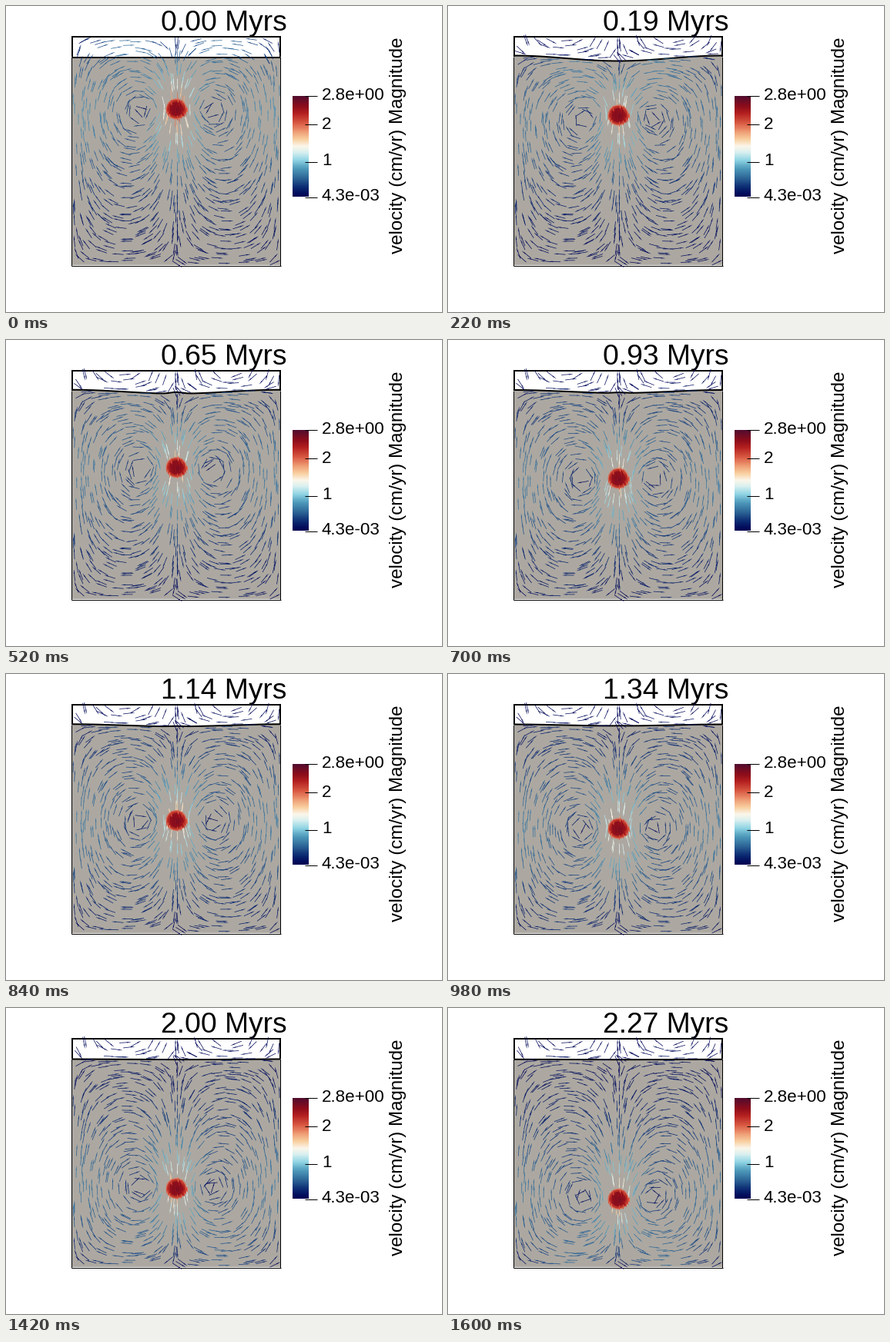
A matplotlib script that plays this animation: 566 by 398 pixels, repeating every 1.62 s.

```python
import numpy as np
import matplotlib.pyplot as plt
from matplotlib.animation import FuncAnimation
from matplotlib.collections import LineCollection, PolyCollection
from matplotlib.colors import LinearSegmentedColormap
from matplotlib.patches import Circle

W, H, DPI = 566, 398, 64
PT = 72 / DPI  # points per pixel
FRAMES, STEP = 81, 20

LEFT, RIGHT, TOP, BOTTOM = 86, 356, 40, 337
CX, HALF = 221, 135
ROCK_TOP = 66
VMAX = 2.8
GLYPH = 15

# key poses over the loop
KEYS = [0, 11, 18, 35, 49, 63, 80]
TIME = [0, 0.19, 0.41, 0.93, 1.34, 1.76, 2.27]
BALL_Y = [134, 142, 153, 180, 201, 222.5, 248.5]
EDGE = [67, 64.5, 64.5, 65, 65.5, 66.2, 66.8]
DIP = [0, 7, 6, 4, 2, 1, 0.4]
BUMP = [0, 0, 3, 0.8, 0.3, 0.2, 0]

cmap = LinearSegmentedColormap.from_list("speed", [
    (0, "#000052"), (0.08, "#08246e"), (0.18, "#2c6496"), (0.28, "#4f9abb"),
    (0.36, "#8fd4e4"), (0.44, "#d8f0f0"), (0.5, "#fbf6ea"), (0.57, "#f8cfa0"),
    (0.65, "#ee9a72"), (0.73, "#d95a43"), (0.83, "#b4201f"), (0.9, "#8c0d1b"),
    (1, "#520c2e")])

rng = np.random.default_rng(4)


def make_seeds(nx=18, ny=20, per_cell=2):
    gx, gy, _ = np.meshgrid(np.arange(nx), np.arange(ny), np.arange(per_cell))
    fx = (gx + rng.random(gx.shape)) / nx
    fy = (gy + rng.random(gy.shape)) / ny
    x = LEFT + 1 + fx.ravel() * (RIGHT - LEFT - 2)
    y = TOP + 3 + fy.ravel() * (BOTTOM - TOP - 5)
    mid = np.arange(TOP + 8, BOTTOM, 18)
    return np.append(x, np.full(mid.size, CX + 1.5)), np.append(y, mid)


SX, SY = make_seeds()
KX = np.arange(1, 31) * np.pi / HALF


def sinker_flow(x, y, ball_y, top):
    """Stokes flow of a sinking disk in a free-slip box, as a sine series."""
    ky = np.arange(1, 41) * np.pi / (BOTTOM - top)
    k2 = KX[:, None] ** 2 + ky[None, :] ** 2
    amp = KX[:, None] / k2 ** 2 * np.sin(ky * (ball_y - top)) * np.exp(-k2 * 40)
    px, py = np.outer(x - CX, KX), np.outer(y - top, ky)
    vx = -((np.sin(px) @ (amp * ky)) * np.cos(py)).sum(1)
    vy = ((np.cos(px) @ (amp * KX[:, None])) * np.sin(py)).sum(1)
    peak = ((amp * KX[:, None]).sum(0) * np.sin(ky * (ball_y - top))).sum()
    return vx / peak, vy / peak


def air_flow(x, y, surface):
    """Bowl-shaped cells dragged along by the surface, open at the top."""
    h = np.clip(surface - y, 0, 27)
    k = np.pi / HALF
    vx = -np.sin(k * (x - CX)) * (1 - h / 28)
    vy = -k * np.cos(k * (x - CX)) * (h - h ** 2 / 56) * 1.4
    return 0.08 * vx, 0.08 * vy


def surface_at(x, i):
    edge, dip, bump = (np.interp(i, KEYS, k) for k in (EDGE, DIP, BUMP))
    u = np.abs(x - CX) / HALF
    return (edge + dip * 0.5 * (1 + np.cos(np.pi * u))
            - bump * np.exp(-(u / 0.08) ** 2))


def clock(i):
    if i < KEYS[1]:
        return 0.0032 * i + 0.00128 * i * i  # time steps grow at the start
    return np.interp(i, KEYS, TIME)


def flow(i, ball_y):
    surface = surface_at(SX, i)
    rock_v = sinker_flow(SX, SY, ball_y, ROCK_TOP)
    air_v = air_flow(SX, SY, surface)
    settled = np.where(SY < surface, air_v, rock_v)
    w = np.exp(-clock(i) / 0.06)  # surface not yet relaxed
    fresh = np.array(sinker_flow(SX, SY, ball_y, TOP - 4))
    return (1.9 + 0.4 * w) * (w * fresh + (1 - w) * settled)


# arrow outline along its axis: position, half width
ARROW = np.array([(-0.5, 0.36), (0.15, 0.36), (0.15, 0.68), (0.5, 0.1),
                  (0.5, -0.1), (0.15, -0.68), (0.15, -0.36), (-0.5, -0.36)])


def arrows(vx, vy, speed):
    d = np.stack([vx, vy], 1) / np.maximum(speed, 1e-9)[:, None]
    n = np.stack([-d[:, 1], d[:, 0]], 1)
    base = np.stack([SX, SY], 1)[:, None]
    return (base + GLYPH * ARROW[None, :, :1] * d[:, None]
            + ARROW[None, :, 1:] * n[:, None])


fig = plt.figure(figsize=(W / DPI, H / DPI), dpi=DPI, facecolor="white")
ax = fig.add_axes([0, 0, 1, 1])
ax.imshow(np.linspace(1, 0, 256)[:, None], cmap=cmap, aspect="auto",
          extent=(372, 393, 248, 117))
ax.set_xlim(0, W)
ax.set_ylim(H, 0)
ax.axis("off")


def label(x, y, s, size, **kw):
    return ax.text(x, y, s, fontsize=size * PT, family="Liberation Sans",
                   ha="left", va="baseline", color="black", **kw)


def stroke(xs, ys, width, z=4):
    return ax.plot(xs, ys, color="black", lw=width * PT, zorder=z,
                   solid_capstyle="butt", solid_joinstyle="miter")[0]


def hline(x0, x1, row):
    stroke([x0, x1], [row + 0.75] * 2, 1)  # lands on one pixel row


def vline(col, y0, y1):
    stroke([col + 0.25] * 2, [y0, y1], 1)


title = label(201, 32, "", 37.2)
for row, base, s in [(116, 122, "2.8e+00"), (153, 160, "2"),
                     (202, 207, "1"), (248, 253, "4.3e-03")]:
    hline(388, 404, row)
    label(410, base, s, 22.4)
label(515.5, 321.5, "velocity (cm/yr) Magnitude", 24.1,
      rotation=90, rotation_mode="anchor")

LINE_X = np.linspace(LEFT, RIGHT, 136)
rock = ax.fill([0, 0, 0], [0, 0, 0], color="#aca8a1", lw=0, zorder=1)[0]
disks = [ax.add_patch(Circle((CX, 0), r, color=c, lw=0, zorder=6))
         for r, c in [(13.5, "#d8705a"), (12, "#bb3025"), (9.5, "#8e0f1c")]]
stroke([LEFT - 1, RIGHT + 1], [TOP, TOP], 2)
for x in (LEFT, RIGHT):
    stroke([x, x], [TOP, ROCK_TOP], 2)
vline(LEFT - 1, ROCK_TOP, BOTTOM + 1)
vline(RIGHT, ROCK_TOP, BOTTOM + 1)
hline(LEFT - 1, RIGHT + 1, BOTTOM)
surface_line = stroke(LINE_X, LINE_X, 2)

glyphs = PolyCollection([], zorder=5, linewidths=0)
ax.add_collection(glyphs)

# short vertical streaks that travel with the disk
r, a = 14 * np.sqrt(rng.random(50)), 2 * np.pi * rng.random(50)
BX, BY = r * np.cos(a), r * np.sin(a)
streaks = LineCollection([], zorder=7, linewidths=1 * PT,
                         colors=cmap(0.93 - 0.24 * (r / 14) ** 3))
ax.add_collection(streaks)


def draw(i):
    ball_y = np.interp(i, KEYS, BALL_Y)
    title.set_text(f"{clock(i):.2f} Myrs")

    top = surface_at(LINE_X, i)
    surface_line.set_data(LINE_X, top)
    rock.set_xy(np.vstack([np.column_stack([LINE_X, top]),
                           [(RIGHT, BOTTOM), (LEFT, BOTTOM)]]))

    for disk in disks:
        disk.center = (CX, ball_y)
    streaks.set_segments([[(CX + x, ball_y + y - 3), (CX + x, ball_y + y + 3)]
                          for x, y in zip(BX, BY * 0.85)])

    vx, vy = flow(i, ball_y)
    speed = np.hypot(vx, vy)
    glyphs.set_verts(arrows(vx, vy, speed))
    glyphs.set_facecolor(cmap(speed / VMAX))
    return title, surface_line, rock, streaks, glyphs, *disks


anim = FuncAnimation(fig, draw, frames=FRAMES, interval=STEP, repeat=True,
                     repeat_delay=0, blit=False)
plt.show()
```
